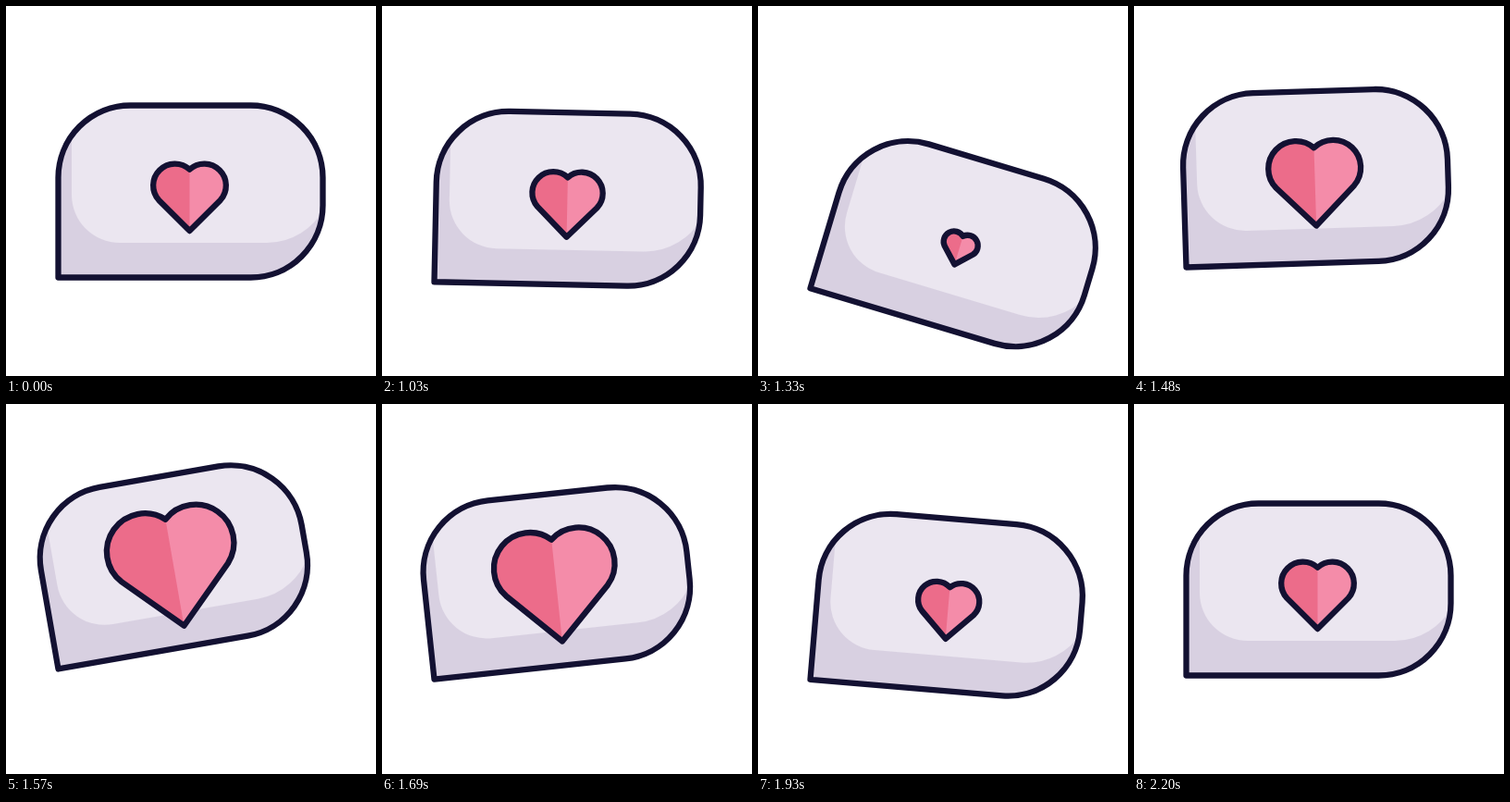
An HTML page for the animation above (2.23 s loop, 400 px wide and 400 px high).

```html
<!DOCTYPE html>
<html>
<head>
<meta charset="utf-8">
<style>
  html, body { margin: 0; height: 100%; overflow: hidden; background: #fff; }
  svg { display: block; width: 100%; height: 100%; }
  .line { fill: none; stroke: #131132; stroke-width: 6.3; stroke-linejoin: round; }
</style>
</head>
<body>
<svg viewBox="0 0 400 400">
  <defs>
    <path id="shape" d="M0 0V-108A78 78 0 0 1 78-186H208A78 78 0 0 1 286-108V-78A78 78 0 0 1 208 0Z"/>
    <clipPath id="inside"><use href="#shape"/></clipPath>
    <path id="love" d="M0-29.8A23.5 23.5 0 0 0-33.2 3.4L0 36.6 33.2 3.4A23.5 23.5 0 0 0 0-29.8Z"/>
  </defs>
  <g id="bubble">
    <use href="#shape" fill="#d8d0e1"/>
    <path clip-path="url(#inside)" fill="#ebe6f0" d="M14.5-190V-89.5A52 52 0 0 0 66.5-37.5H225.5A70 70 0 0 0 288.5-77V-190Z"/>
    <use href="#shape" class="line"/>
    <g id="heart">
      <use href="#love" fill="#ec6c8a"/>
      <path fill="#f48ca9" d="M0-29.8A23.5 23.5 0 0 1 33.2 3.4L0 36.6Z"/>
      <use id="heartLine" href="#love" class="line"/>
    </g>
  </g>
</svg>
<script>
const LOOP = 2230, REST = 1030, STEP = 30;
const START = -1.6, SWING = 10; // in steps after the rest
const $ = id => document.getElementById(id);
const bubble = $('bubble'), heart = $('heart'), heartLine = $('heartLine');

const ease = u => u * u * (3 - 2 * u);

// Leaves rest, reaches the first extreme at `peak`, then turns once per SWING and comes back to rest.
function swing(n, peak, rest, ...extremes) {
  const stops = [rest, ...extremes, rest];
  const phase = n < peak ? (n - START) / (peak - START) : 1 + (n - peak) / SWING;
  const i = Math.floor(phase);
  if (n < 0 || i > extremes.length) return rest;
  return stops[i] + (stops[i + 1] - stops[i]) * ease(phase - i);
}

function draw(now) {
  const n = Math.floor((now % LOOP - REST) / STEP);
  const y = swing(n, 5.1, 293.5, 326.5, 282.5, 302);
  const angle = swing(n, 8.6, 0, 18.2, -10.2, 5.1);
  const scale = swing(n, 9.4, 1, 0.465, 1.83, 0.84);
  bubble.setAttribute('transform', `translate(56.5 ${y}) rotate(${angle})`);
  heart.setAttribute('transform', `translate(142 -87) scale(${scale})`);
  heartLine.style.strokeWidth = 6.3 / scale;
  requestAnimationFrame(draw);
}
draw(performance.now());
</script>
</body>
</html>
```
